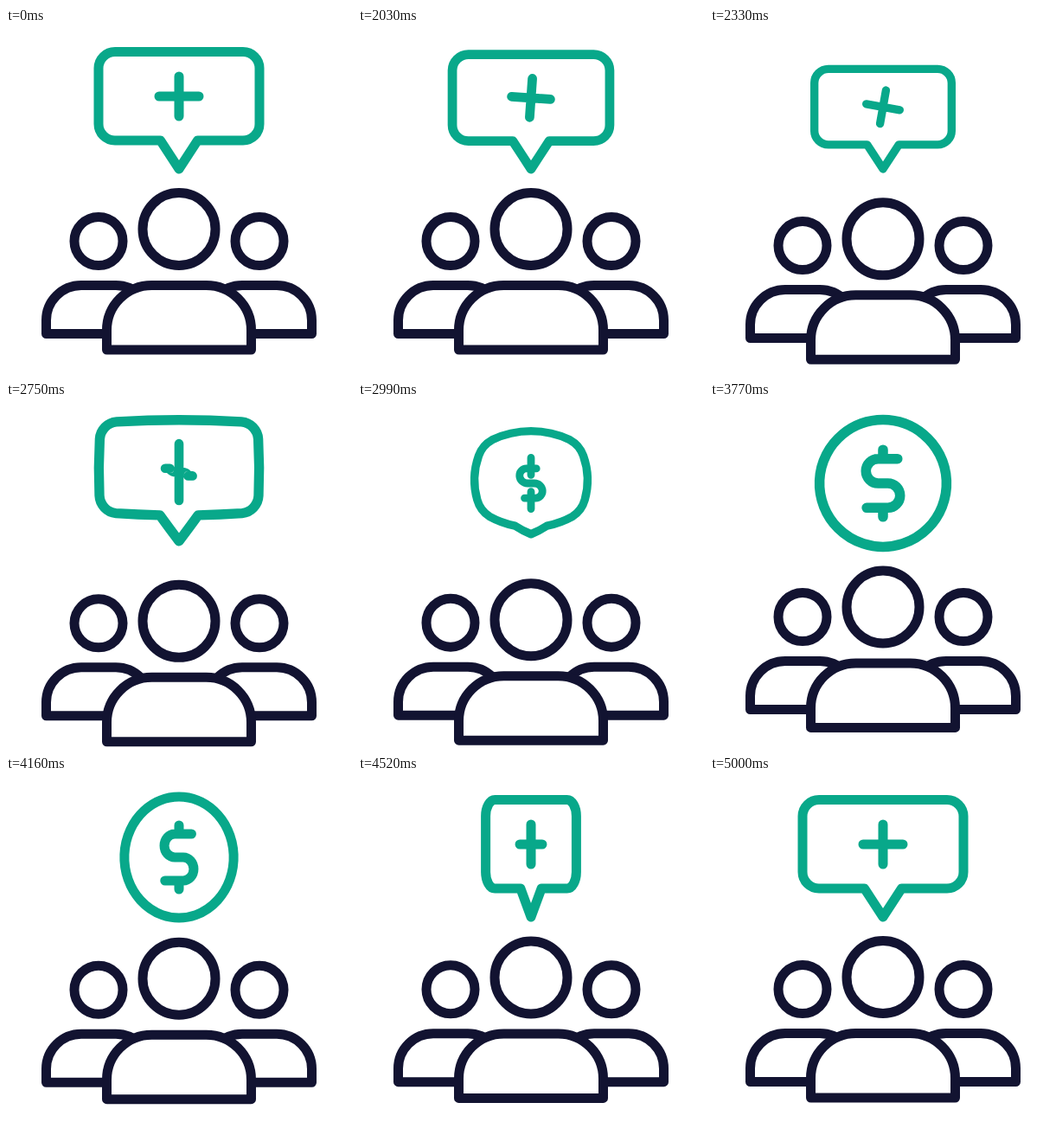
Animation, 400 px wide and 400 px high, one loop 5030 ms. Source, as an HTML page:

```html
<!DOCTYPE html>
<html lang="en">
<head>
<meta charset="utf-8">
<title>Group talk and coin</title>
<style>
  html, body { margin: 0; width: 100%; height: 100%; overflow: hidden; background: #fff; }
  svg { display: block; width: 100%; height: 100%; }
  .people { fill: #fff; stroke: #121331; }
  .talk { fill: none; stroke: #08a88a; }
</style>
</head>
<body>
<svg viewBox="0 0 400 400" stroke-width="11" stroke-linecap="round" stroke-linejoin="round">
  <g class="people">
    <g id="sides">
      <circle cx="107" cy="246.5" r="28"/>
      <circle cx="293" cy="246.5" r="28"/>
      <path d="M46.5 353.5V338A40.5 40.5 0 0 1 87 297.5H127A40.5 40.5 0 0 1 167.5 338V353.5Z"/>
      <path d="M232.5 353.5V338A40.5 40.5 0 0 1 273 297.5H313A40.5 40.5 0 0 1 353.5 338V353.5Z"/>
    </g>
    <g id="middle">
      <circle cx="200" cy="232.5" r="42"/>
      <path d="M116.5 372V349.5A52 52 0 0 1 168.5 297.5H231.5A52 52 0 0 1 283.5 349.5V372Z"/>
    </g>
  </g>
  <g class="talk">
    <path id="frame"/>
    <path id="sign"/>
  </g>
</svg>
<script>
const LOOP = 5030, START = 2030, FLIP = 4380, TIP = 69, PI = Math.PI;
const el = id => document.getElementById(id);
const lerp = (a, b, k) => a + (b - a) * k;
const clamp = x => Math.min(1, Math.max(0, x));
const span = (t, a, b) => clamp((t - a) / (b - a));
const smooth = (t, a, b) => { const u = span(t, a, b); return u * u * (3 - 2 * u); };

// Slow-settling cubic ease with handles (x1, 0) and (x2, 1)
function settle(u, x1, x2) {
  let lo = 0, hi = 1;
  for (let i = 0; i < 24; i++) {
    const s = (lo + hi) / 2, r = 1 - s;
    if (3 * s * r * r * x1 + 3 * s * s * r * x2 + s ** 3 < u) lo = s; else hi = s;
  }
  return lo * lo * (3 - 2 * lo);
}

// Every segment is a cubic: [start, handle, handle, end]
const line = (x, y, u, v) => [0, 1 / 3, 2 / 3, 1].map(k => [lerp(x, u, k), lerp(y, v, k)]);
function arc(cx, cy, r, a, b) {
  const h = 4 / 3 * Math.tan((b - a) / 4);
  const at = (n, k) => [cx + r * (Math.cos(n) - k * Math.sin(n)), cy + r * (Math.sin(n) + k * Math.cos(n))];
  return [at(a, 0), at(a, h), at(b, -h), at(b, 0)];
}
const pairs = (list, make) => list.slice(1).map((b, i) => make(list[i], b));
const mirrored = half => [...half,
  ...[...half].reverse().map(s => [...s].reverse().map(([x, y]) => [-x, y]))];

const bubble = mirrored([
  line(0, TIP, 21.5, 36), line(21.5, 36, 74, 36), arc(74, 17, 19, PI / 2, 0),
  line(93, 17, 93, -47.5), arc(74, -47.5, 19, 0, -PI / 2), line(74, -66.5, 0, -66.5)
]);
const coin = mirrored(pairs([.5, .4, .25, .12, -.15, -.28, -.5],
  (a, b) => arc(0, 0, 70, a * PI, b * PI)));
const bar = pairs([-23, -12, -8, -3.5, 3.5, 8, 12, 23], (a, b) => line(a, 0, b, 0));
const dollar = [
  line(16, -27, -5.3, -27),
  arc(-5.3, -13.5, 13.5, -PI / 2, -PI), arc(-5.3, -13.5, 13.5, -PI, -1.5 * PI),
  line(-5.3, 0, 5.3, 0),
  arc(5.3, 13.5, 13.5, -PI / 2, 0), arc(5.3, 13.5, 13.5, 0, PI / 2),
  line(5.3, 27, -18, 27)
];

const mix = (a, b, k) => a.map((s, i) => s.map((p, j) => p.map((v, n) => lerp(v, b[i][j][n], k))));
const place = (segs, f) => segs.map(s => s.map(f));
function trace(segs, sx) {
  const put = ([x, y]) => (200 + x * sx).toFixed(2) + ' ' + (94 + y).toFixed(2);
  return 'M' + put(segs[0][0]) + segs.map(s => 'C' + s.slice(1).map(put).join(' ')).join('');
}

function draw(t) {
  const moving = t >= START;
  const push = moving ? 21 * (smooth(t, START, 2600) - settle(span(t, 2600, 5000), .4, .15)) : 0;
  el('middle').setAttribute('transform', `translate(0 ${push})`);
  el('sides').setAttribute('transform', `translate(0 ${push * .45})`);

  let size = 1, turn = 0, morph = 0, shift = 0, split = 0, sx = 1;
  const coinSize = .8 + .257 * smooth(t, 3150, 3680) - .057 * smooth(t, 3680, 4060);
  if (t >= FLIP) {
    sx = 1 - (1 - span(t, FLIP, 4960)) ** 3;
  } else if (moving) {
    size = 1 - .2 * smooth(t, 1975, 2240) + .275 * smooth(t, 2240, 2560);
    turn = PI * smooth(t, 1970, 2640);
    morph = smooth(t, 2610, 3150);
    shift = smooth(t, 2600, 2950);
    split = smooth(t, 2850, 3150);
    sx = 1 - span(t, 4060, FLIP) ** 2;
  }
  // A half turn leaves the plus unchanged, so the dollar starts upright
  if (turn >= PI) turn = 0;

  const outline = mix(
    place(bubble, ([x, y]) => [x * size, TIP + (y - TIP) * size]),
    place(coin, ([x, y]) => [x * coinSize, y * coinSize]), morph);
  el('frame').setAttribute('d', trace(outline, sx) + 'Z');
  el('frame').setAttribute('stroke-width', 11 * lerp(size, coinSize, morph));

  const scale = lerp(size, coinSize, shift);
  const cy = lerp(TIP - 84 * size, 0, shift);
  const c = Math.cos(turn) * scale, s = Math.sin(turn) * scale;
  const spin = ([x, y]) => [x * c - y * s, cy + x * s + y * c];
  const outer = lerp(23, 37, clamp(2 * shift)), inner = 27 * split;
  const strokes = [mix(bar, dollar, morph), [line(0, -outer, 0, -inner)], [line(0, inner, 0, outer)]];
  el('sign').setAttribute('d', strokes.map(p => trace(place(p, spin), sx)).join(''));
  el('sign').setAttribute('stroke-width', 11 * scale);
}

let origin;
function tick(now) {
  origin ??= now;
  draw((now - origin) % LOOP);
  requestAnimationFrame(tick);
}
draw(0);
requestAnimationFrame(tick);
</script>
</body>
</html>
```
